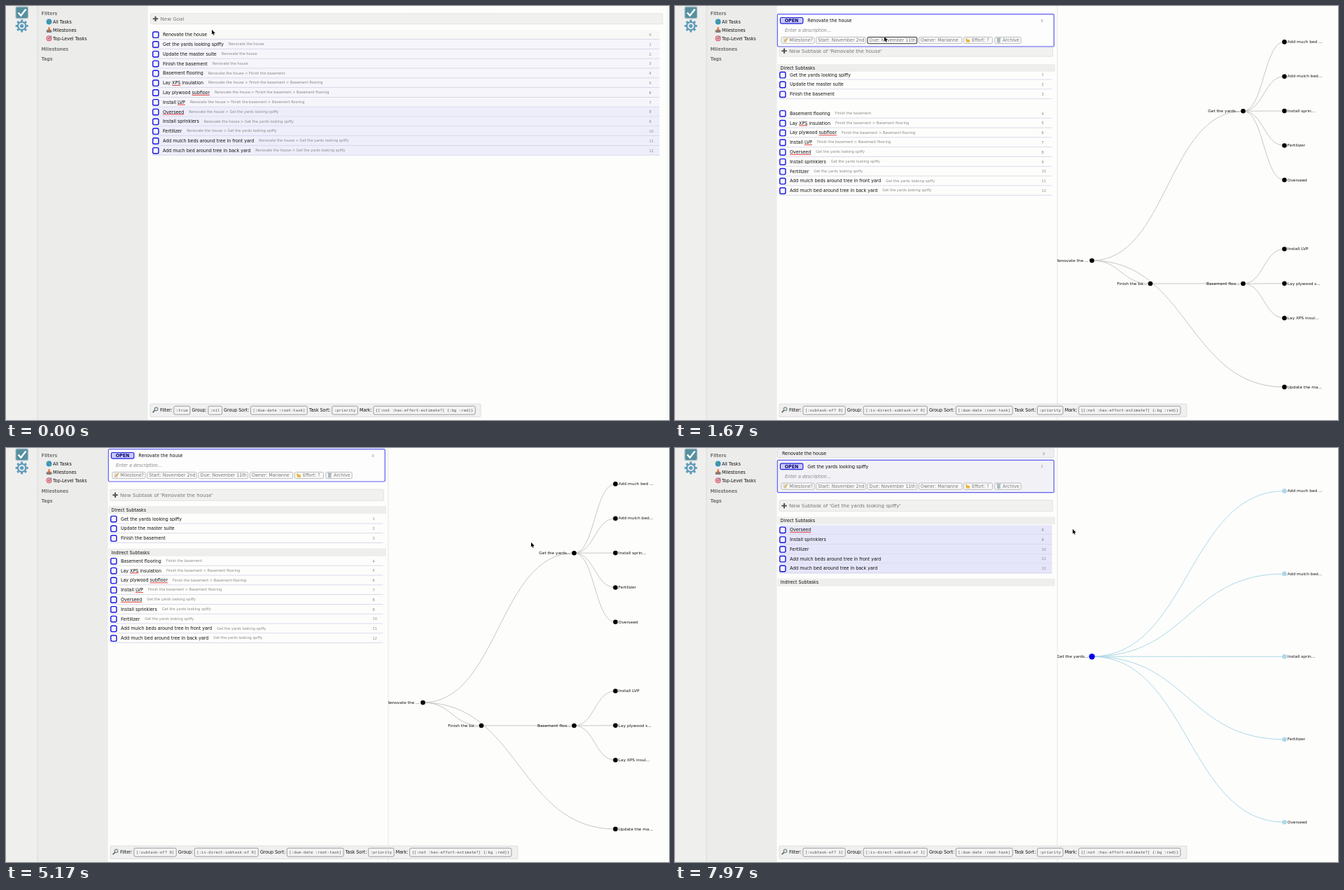
Recreate the animation shown at these times as an HTML page with a canvas. Size 947 by 592 pixels, loop 8 s.

```html
<!DOCTYPE html>
<html lang="en">
<head>
<meta charset="utf-8">
<title>Goal planner</title>
<style>
html, body { margin: 0; width: 100%; height: 100%; overflow: hidden; background: #fdfdfc; }
canvas { display: block; }
</style>
</head>
<body>
<canvas id="stage" width="947" height="592"></canvas>
<script>
const g = document.getElementById('stage').getContext('2d');
const LOOP = 8000, SANS = '"DejaVu Sans", sans-serif', MONO = '"DejaVu Sans Mono", monospace';
const LAVENDER = '#e6e6fa', LIGHT = '#add8e6', STEP = 13.8;

const names = ['Renovate the house', 'Get the yards looking spiffy', 'Update the master suite',
  'Finish the basement', 'Basement flooring', 'Lay XPS insulation', 'Lay plywood subfloor',
  'Install LVP', 'Overseed', 'Install sprinklers', 'Fertilizer',
  'Add mulch beds around tree in front yard', 'Add much bed around tree in back yard'];
const parent = [-1, 0, 0, 0, 3, 4, 4, 4, 1, 1, 1, 1, 1];
const misspelt = /XPS|subfloor|LVP|Overseed/;

// time, x, y of the pointer tip
const pointerKeys = [[0, 294, 34], [470, 294, 34], [630, 297, 45], [970, 299, 44], [1800, 299, 44],
  [2000, 299, 47], [2300, 299, 47], [2870, 283, 107], [4070, 283, 107], [4430, 520, 112],
  [4670, 520, 112], [4870, 613, 121], [5030, 613, 121], [5170, 750, 135], [5370, 750, 135],
  [5670, 811, 150], [7500, 811, 150], [7630, 634, 100], [7930, 634, 100], [7970, 568, 116], [8000, 568, 116]];

const ramp = (t, a, b) => Math.min(1, Math.max(0, (t - a) / (b - a)));
const lerp = (a, b, k) => a + (b - a) * k;
const easeOut = (u, power) => 1 - (1 - u) ** power;

function fade(alpha, draw) {
  if (alpha <= 0) return;
  g.save();
  g.globalAlpha *= alpha;
  draw();
  g.restore();
}

function fill(x, y, w, h, color) {
  g.fillStyle = color;
  g.fillRect(x, y, w, h);
}

function box(x, y, w, h, r, stroke, bg, width = 0.8) {
  g.beginPath();
  g.roundRect(x, y, w, h, r);
  if (bg) { g.fillStyle = bg; g.fill(); }
  if (stroke) { g.strokeStyle = stroke; g.lineWidth = width; g.stroke(); }
}

function disc(x, y, r, color) {
  g.fillStyle = color;
  g.beginPath();
  g.arc(x, y, r, 0, 7);
  g.fill();
}

function line(points, color, width = 1) {
  g.strokeStyle = color;
  g.lineWidth = width;
  g.beginPath();
  points.forEach(([x, y]) => g.lineTo(x, y));
  g.stroke();
}

// Set large and scaled down, so that advances stay fractional. Returns the width.
function text(s, x, y, { size = 6.3, color = '#111', style = '', family = SANS, align = 'left' } = {}) {
  const k = size / 100;
  g.save();
  g.translate(x, y + size * 0.36);
  g.scale(k, k);
  g.font = `${style} 100px ${family}`;
  g.textAlign = align;
  g.fillStyle = color;
  g.fillText(s, 0, 0);
  const w = g.measureText(s).width * k;
  g.restore();
  return w;
}

function textWidth(s, size = 6.3) {
  g.font = `100px ${SANS}`;
  return g.measureText(s).width * size / 100;
}

function plus(x, y) {
  fill(x - 3.7, y - 1, 7.4, 2, '#555');
  fill(x - 1, y - 3.7, 2, 7.4, '#555');
}

function globe(x, y) {
  disc(x, y, 3.9, '#2f8fd8');
  disc(x - 1.4, y - 1.2, 1.5, '#5fa845');
  disc(x + 1.1, y + 1.3, 1.3, '#5fa845');
}

function inbox(x, y) {
  box(x - 3.8, y, 7.6, 3.6, 1, null, '#777f86');
  line([[x, y - 4], [x, y + 1]], '#d9642c', 2);
  line([[x - 2, y - 0.6], [x, y + 1.4], [x + 2, y - 0.6]], '#d9642c', 1.2);
}

function target(x, y) {
  ['#d6404f', '#f4dfe2', '#d6404f', '#f4dfe2'].forEach((c, i) => disc(x, y, 3.9 - i, c));
  line([[x, y], [x + 3.6, y - 3.6]], '#3b88c3', 1);
}

function bigIcons() {
  box(14, 1.2, 17.5, 16.4, 2, '#a9bcc6', '#55909f', 1.2);
  line([[17.5, 9.5], [21.3, 13.7], [28.5, 4.5]], '#fff', 2.4);
  for (let i = 0; i < 8; i++) {
    const a = i * Math.PI / 4, c = Math.cos(a), s = Math.sin(a);
    line([[22.6 + 5 * c, 28.5 + 5 * s], [22.6 + 9 * c, 28.5 + 9 * s]], '#5f9cba', 3);
  }
  disc(22.6, 28.5, 6.8, '#5f9cba');
  disc(22.6, 28.5, 4.6, '#e4e9ed');
  disc(22.6, 28.5, 2.6, '#5f9cba');
}

function sidebar(right) {
  fill(0, 0, 45, 592, '#efefee');
  fill(45, 0, right - 45, 592, '#ececeb');
  fill(44.5, 0, 0.8, 592, '#d8d8dc');
  bigIcons();
  [['Filters', 10.3], ['Milestones', 62], ['Tags', 76]].forEach(([s, y]) =>
    text(s, 50.6, y, { style: 'bold', color: '#777' }));
  globe(61.5, 22.5);
  inbox(61.5, 34.3);
  target(61.5, 46.3);
  ['All Tasks', 'Milestones', 'Top-Level Tasks'].forEach((s, i) => text(s, 67, 22.5 + i * 11.9));
}

function toolbar(x, right, filter, group) {
  box(x, 569, right - x, 18.4, 1, '#d8d8dc', '#f0f0f0');
  line([[x + 3.6, 581.3], [x + 6.8, 578]], '#555', 1.6);
  g.beginPath();
  g.arc(x + 8.5, 576.3, 2.5, 0, 7);
  g.fillStyle = '#cfe3ee';
  g.fill();
  g.strokeStyle = '#666';
  g.lineWidth = 1;
  g.stroke();
  let at = x + 14;
  [['Filter:', filter], ['Group:', group], ['Group Sort:', '[:due-date :root-task]'],
    ['Task Sort:', ':priority'], ['Mark:', '{[:not :has-effort-estimate?] {:bg :red}}']].forEach(([label, code]) => {
    at += text(label, at, 578) + 2.2;
    const w = code.length * 3.4 + 6;
    box(at, 572.2, w, 12, 2, '#888', '#f3f3f3');
    text(code, at + 3, 577.7, { size: 5.65, family: MONO, color: '#555' });
    at += w + 2.6;
  });
}

function newBar(label, x, right, y, h) {
  box(x, y - h / 2, right - x, h, 1, '#dfdfe0', '#f1f1f0');
  plus(x + 7, y);
  text(label, x + 14, y, { size: 7.1, color: '#777' });
}

function crumbs(i, root) {
  const path = [];
  for (let p = parent[i]; p >= 0 && p !== root; p = parent[p]) path.unshift(names[p]);
  return path.join(' > ');
}

// x is the left side of the row
function row(i, x, right, y, root, hot, color = LAVENDER) {
  fade(hot, () => fill(x, y - 6.6, right - x, STEP, color));
  fill(x, y + 6.3, right - x, 0.8, '#d3d3e4');
  box(x + 0.7, y - 3.9, 8.2, 8.4, 1.8, '#1616dc', '#f4f4ff', 1.4);
  const name = names[i], tx = x + 15;
  const w = text(name, tx, y);
  const bad = name.match(misspelt);
  if (bad) {
    const ux = tx + textWidth(name.slice(0, bad.index));
    fill(ux, y + 3.2, textWidth(bad[0]), 0.9, '#e03030');
  }
  text(crumbs(i, root), tx + w + 7, y - 0.4, { size: 5.07, color: '#888' });
  text(i, right - 15, y + 0.2, { size: 5.07, color: '#888' });
}

function chip(x, right, y, label, tx, hot) {
  box(x, y - 4.5, right - x, 9.2, 1.8, hot ? '#333' : '#aaa', '#fafafa', hot ? 1.1 : 0.8);
  text(label, tx, y, { color: '#777' });
}

function card(focus, y, bg, hotDue) {
  box(146.3, y - 9, 395, 46.3, 1.5, '#5c5cf2', bg, 1.2);
  box(150.4, y - 4.2, 32.4, 8.6, 1.8, '#1c1ce0', '#c9c9fb', 1.2);
  text('OPEN', 166.5, y + 0.2, { style: 'bold', color: '#0a0a70', align: 'center' });
  text(names[focus], 189.3, y);
  text(focus, 522.4, y, { size: 5.07, color: '#888' });
  text('Enter a description...', 157, y + 14.3, { style: 'italic', color: '#888' });
  const cy = y + 28.3;
  chip(151.8, 199, cy, 'Milestone?', 163.3);
  chip(201.7, 272.3, cy, 'Start: November 2nd', 204.2);
  chip(275, 345.6, cy, 'Due: November 11th', 277.6, hotDue);
  chip(348.4, 409.8, cy, 'Owner: Marianne', 350.7);
  chip(412.4, 453.4, cy, 'Effort: ?', 424);
  chip(456.8, 494.2, cy, 'Archive', 468);
  fill(154.5, cy - 3, 5, 6.2, '#dcd8c8');
  line([[156.5, cy + 2], [161, cy - 3]], '#d9a441', 1.3);
  line([[416, cy - 2.6], [417, cy + 1.6], [421, cy + 1.6]], '#e8b53a', 2.4);
  disc(419, cy + 0.8, 2, '#e8b53a');
  fill(460, cy - 2, 4.6, 5.4, '#a9b9c2');
  fill(459.3, cy - 3.2, 6, 1, '#8496a1');
}

function heading(label, y) {
  fill(146.5, y - 5.6, 396.5, 11, '#eeeeed');
  text(label, 150.6, y);
}

const wholeTree = { 0: [595.5, 364], 1: [811.5, 150.2], 3: [679, 397], 4: [811.5, 397] };
[12, 11, 9, 10, 8, null, 7, 6, 5, null, 2].forEach((id, i) => {
  if (id) wholeTree[id] = [870.5, 51.4 + i * 49.35];
});
const yardTree = { 1: [595.5, 298.2] };
[12, 11, 9, 10, 8].forEach((id, i) => { yardTree[id] = [870.5, 61.5 + i * 118.4]; });

function edge([x0, y0], [x1, y1], color) {
  const mid = (x0 + x1) / 2;
  g.strokeStyle = color;
  g.lineWidth = 1;
  g.beginPath();
  g.moveTo(x0, y0);
  g.bezierCurveTo(mid, y0, mid, y1, x1, y1);
  g.stroke();
}

function tree(nodes, hot) {
  g.save();
  g.beginPath();
  g.rect(546, 0, 401, 592);
  g.clip();
  const ids = Object.keys(nodes).map(Number);
  ids.filter(id => nodes[parent[id]]).forEach(id => {
    const from = nodes[parent[id]], lit = parent[id] === 1 ? hot : 0;
    fade(1 - lit, () => edge(from, nodes[id], '#c6c6c4'));
    fade(lit, () => edge(from, nodes[id], LIGHT));
  });
  ids.forEach(id => {
    const [x, y] = nodes[id], name = names[id], inner = parent.includes(id);
    const lit = parent[id] === 1 ? hot : 0;
    fade(1 - lit, () => disc(x, y, 3.3, '#000'));
    fade(lit, () => disc(x, y, 3.3, LIGHT));
    if (id === 1) fade(hot, () => disc(x, y, 4.2, '#0000e8'));
    const label = name.length > 13 ? name.slice(0, 13) + '...' : name;
    text(label, x + (inner ? -4.8 : 4.3), y - 0.4, { size: 5.85, align: inner ? 'right' : 'left' });
  });
  g.restore();
}

const listY = i => 40.9 + STEP * i;
const detailY = i => i < 4 ? 101.3 + STEP * (i - 1) : 161.5 + STEP * (i - 4);

function listView(t) {
  sidebar(202.5);
  newBar('New Goal', 206.5, 938, 18.3, 15);
  const u = ramp(t, 0, 230);
  names.forEach((_, i) => {
    const hot = lerp(i > 7 ? 0.65 : 0.35, 1, u);
    row(i, 209, 933.5, listY(i), null, hot, i ? LAVENDER : '#eeeeef');
  });
  fill(944, 0, 0.8, 592, '#f0f0f0');
  toolbar(206, 678, ':true', ':nil');
}

function detailView(focus) {
  sidebar(145.5);
  fill(545.6, 0, 0.8, 592, '#dedee2');
  toolbar(149, 731, `[:subtask-of? ${focus}]`, `[:is-direct-subtask-of ${focus}]`);
}

function houseView(t) {
  const u = ramp(t, 1470, 1770), direct = easeOut(u, 2.5), indirect = easeOut(u, 1.9);
  const hot = ramp(t, 2670, 2870) - ramp(t, 4670, 4870) + ramp(t, 5570, 5770);
  const leftover = 1 - ramp(t, 1470, 1670);
  detailView(0);
  newBar("New Subtask of 'Renovate the house'", 149, 539.5, lerp(18, 67.3, direct), 16);
  heading('Direct Subtasks', 88.6);
  if (u === 1) heading('Indirect Subtasks', 149.3);
  for (let i = 1; i < 13; i++) {
    const y = lerp(listY(i), detailY(i), i < 4 ? direct : indirect);
    row(i, 149, 538.5, y, 0, Math.max(leftover, i === 1 || i > 7 ? hot : 0), i === 1 ? '#ececee' : LAVENDER);
  }
  card(0, 10.7 + 30.3 * (1 - u), '#fdfdfd', t < 2400);
  tree(wholeTree, hot);
}

function yardView(t) {
  const u = ramp(t, 6830, 7130), e = easeOut(u, 2.5);
  detailView(1);
  box(146.3, 1, 395, 12.5, 1, '#d8d8e0', '#efeff0');
  text(names[0], 153, 7.6);
  text(0, 525.2, 7.8, { size: 5.07, color: '#888' });
  newBar(`New Subtask of '${names[1]}'`, 149, 539.5, lerp(67.3, 82.6, e), 16);
  heading('Direct Subtasks', lerp(88.6, 104, e));
  for (let i = 8; i < 13; i++) row(i, 149, 538.5, lerp(detailY(i), 117 + STEP * (i - 8), e), 1, 1);
  if (u === 1) heading('Indirect Subtasks', 192.2);
  card(1, 26.3 + 75 * (1 - u), '#f2f2f6');
  tree(yardTree, 1);
}

function pointer(t) {
  const next = Math.max(1, pointerKeys.findIndex(k => k[0] > t));
  const [t0, x0, y0] = pointerKeys[next - 1], [t1, x1, y1] = pointerKeys[next];
  const k = ramp(t, t0, t1);
  g.save();
  g.translate(lerp(x0, x1, k), lerp(y0, y1, k));
  g.beginPath();
  [[0, 0], [0, 6.6], [1.5, 5.3], [2.6, 7.7], [3.7, 7.2], [2.7, 4.9], [4.8, 4.8]].forEach(p => g.lineTo(...p));
  g.closePath();
  g.strokeStyle = '#fff';
  g.lineWidth = 0.8;
  g.stroke();
  g.fillStyle = '#000';
  g.fill();
  g.restore();
}

function frame(now) {
  const t = now % LOOP;
  fill(0, 0, 947, 592, '#fdfdfc');
  (t < 1500 ? listView : t < 6830 ? houseView : yardView)(t);
  pointer(t);
  requestAnimationFrame(frame);
}
requestAnimationFrame(frame);
</script>
</body>
</html>
```
